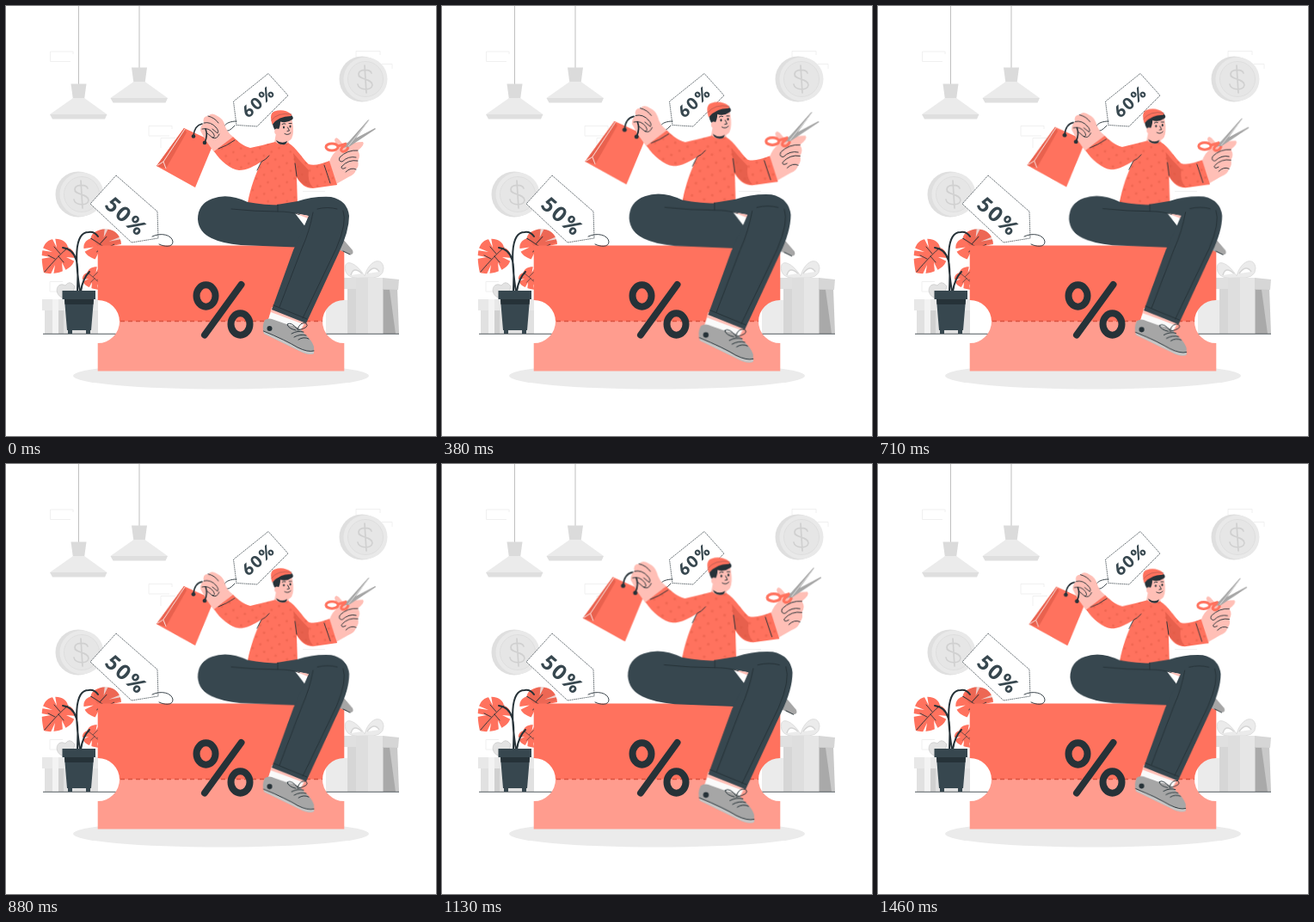
Animation, 500 px wide and 500 px high, one loop 1500 ms. Source, as an HTML page:

```html
<!DOCTYPE html>
<html lang="en">
<head>
<meta charset="utf-8">
<title>Discount coupon</title>
<style>
  html, body { margin: 0; width: 100%; height: 100%; overflow: hidden; background: #fff; }
  svg { display: block; width: 100vw; height: 100vh; }
  text { font-family: Lato, "Open Sans", sans-serif; text-anchor: middle; }
  .coral { fill: #ff725e; }
  .dark { fill: #37474f; }
  .skin { fill: #ffbfb6; }
  .line { fill: none; stroke: #263238; stroke-width: .9; stroke-linecap: round; stroke-linejoin: round; }
  .thick { stroke-width: 1.6; }
  .stem { stroke-width: 2; }
  .frame { fill: none; stroke: #ededed; stroke-width: .8; }
  .tag { fill: #fff; stroke: #263238; stroke-width: .7; stroke-dasharray: 1.6 .7; }
  .price { fill: #37474f; font-weight: 900; }
  #man {
    transform-origin: 302px 263.5px;
    animation: beat 1500ms linear infinite;
  }
  @keyframes beat {
    0%, 100% { transform: scale(1); }
    16% { transform: scale(1.091); }
    25.3% { transform: scale(1.068); }
    38.7% { transform: scale(1.029); }
    57.2% { transform: scale(.992); }
    74.7% { transform: scale(1.091); }
    98.2% { transform: scale(.992); }
  }
</style>
</head>
<body>
<svg viewBox="0 0 500 500">
  <defs>
    <g id="lamp">
      <path d="M84.5 0V92" stroke="#b8b8b8" stroke-width=".9"/>
      <path d="M75.500 90.500H93.500L91 109H78Z" fill="#dbdbdb"/>
      <path d="M78 107H91L117.500 126H51Z" fill="#ebebeb"/>
      <path d="M51 126H117.500L115 131.500H54Z" fill="#dfdfdf"/>
    </g>
    <g id="coin">
      <circle cx="-2" r="26.500" fill="#dfdfdf"/>
      <circle cx="2" r="25.500" fill="#e9e9e9"/>
      <circle cx="2" r="20.500" fill="#e6e6e6" stroke="#dcdcdc" stroke-width=".8"/>
      <path d="M9 -7C7 -12 -5 -12 -6 -6C-7 1 10 -1 10 7C9 14 -6 13 -7 6M1 -16L3 16"
        fill="none" stroke="#d0d0d0" stroke-width="1.700" stroke-linecap="round"/>
    </g>
    <g id="leaf">
      <path class="coral" d="M11 -9C10 -19 -6 -23 -14 -15C-22 -7 -19 10 -17 20C-8 23 6 20 14 13C21 7 21 -6 11 -9Z"/>
      <path d="M-20 0L-9 2L-20 4ZM-19 -9L-7 -4L-20 -6ZM-8 -21L-2 -9L-4 -21ZM-10 24L-4 11L-6 24ZM5 20L4 8L9 18ZM19 7L9 2L20 3Z" fill="#fff"/>
      <path class="line" d="M11 -9Q0 0 -16 19M2 -2L-5 -10M-4 4L-12 0M0 1L6 8"/>
    </g>
    <pattern id="dots" width="14" height="14" patternUnits="userSpaceOnUse" patternTransform="rotate(18)">
      <circle cx="3" cy="3" r="1.400" fill="#d9553f" opacity=".4"/>
      <circle cx="10" cy="10" r="1.400" fill="#d9553f" opacity=".4"/>
    </pattern>
    <path id="sweater" d="M313 158C302 161 293 163 284 165C276 163 270 158 264 152L242 169C249 180 261 190 271 191C280 191 289 186 297 181C290 196 284 212 281 229Q309 234 339 231L338 199C343 208 349 212 357 212L385 208L376 180C366 184 358 186 352 184C345 178 338 165 328 159Q320 164 313 158Z"/>
  </defs>

  <!-- room -->
  <path class="frame" d="M78 56V53H51.500V64.500H75M407 62V52.500H435V57M437 67.500H449V73M193 143V139.500H166V151H190M180 165V153.500H197M66 320.500H51V332H64M345 215.500H371"/>
  <use href="#lamp"/>
  <use href="#lamp" x="70.500" y="-19"/>
  <use href="#coin" x="416" y="85"/>
  <use href="#coin" x="86" y="219"/>

  <ellipse cx="250" cy="430" rx="172" ry="15.500" fill="#ebebeb"/>

  <!-- gifts -->
  <path d="M69 340C54 338 58 319 69 325Q74 318 80 326L76 340Z" fill="#e3e3e3" stroke="#d3d3d3"/>
  <path d="M45 353H107V381H45Z" fill="#e1e1e1"/>
  <path d="M42 341H107V354H42Z" fill="#e8e8e8"/>
  <path d="M54 341H61V381H54Z" fill="#f3f3f3"/>
  <path d="M61 354H67V381H61Z" fill="#d0d0d0"/>
  <path d="M417 314C405 295 391 294 395 309Q398 318 417 316Q439 318 439 305C438 291 422 295 417 314Z" fill="#ebebeb" stroke="#dedede"/>
  <path d="M401 313Q404 302 414 311M420 311Q428 300 434 309" fill="#fff" stroke="#d5d5d5" stroke-width="1.500"/>
  <path d="M372 342H401V381H372Z" fill="#ebebeb"/>
  <path d="M397 328H438V381H397Z" fill="#d6d6d6"/>
  <path d="M438 328H455L457 381H438Z" fill="#c9c9c9"/>
  <path d="M390 316H438V329H390Z" fill="#e0e0e0"/>
  <path d="M438 316L457 318L456 330L438 329Z" fill="#d6d6d6"/>
  <path d="M407 316H421V381H407Z" fill="#dedede"/>
  <path d="M421 316H438V381H421Z" fill="#e6e6e6"/>
  <path d="M439 330H446L453 381H439Z" fill="#a9a9a9"/>
  <path d="M43 381.300H457" stroke="#263238" stroke-width=".8"/>

  <!-- plant -->
  <use href="#leaf" x="61" y="290"/>
  <g>
    <use href="#leaf" transform="translate(112 278) scale(-1.15 .95) rotate(4)"/>
    <path d="M112 259Q130 258 134 275L110 282Q98 272 104 264Z" fill="#b84434" opacity=".25"/>
  </g>
  <use href="#leaf" transform="translate(103 316) scale(-.75 .66)"/>
  <path class="line stem" d="M83 332C83 312 88 284 66 281M86 332C81 300 78 263 96 263Q103 262 107 268M87 332Q89 317 97 309"/>
  <path class="dark" d="M68 341H102L99 377H71ZM72 376H77V381H72ZM93 376H98V381H93Z"/>
  <path d="M68 341H102L101.500 347H68.500Z" fill="#263238"/>
  <path class="dark" d="M65.500 331H104V341H65.500Z"/>

  <!-- coupon -->
  <path class="coral" d="M106.700 278.600H393.300V342A25 25 0 0 0 368 367H132A25 25 0 0 0 106.700 342Z"/>
  <path fill="#ff9c8e" d="M132 366.500H368A25 25 0 0 0 393.300 392V424.600H106.700V392A25 25 0 0 0 132 366.500Z"/>
  <path d="M133 366.500H368" stroke="#d9523f" stroke-width="1.300" stroke-dasharray="5 4"/>
  <g fill="none" stroke="#263238" stroke-width="8" stroke-linecap="round">
    <ellipse cx="232.500" cy="337" rx="11" ry="12.700"/>
    <ellipse cx="272.500" cy="370" rx="11" ry="12.700"/>
    <path d="M273.500 324L231 382.500"/>
  </g>

  <!-- price tags -->
  <path class="tag" d="M128 197L176 239L177 270L146 275L98 230Z"/>
  <path class="line" d="M170 268C180 263 193 266 194 274C194 281 184 280 178 277"/>
  <text class="price" font-size="24" letter-spacing="2.500" transform="translate(140 244.500) rotate(41.500)" y="9">50%</text>
  <path class="tag" d="M305 78.500L328 104L292 140L268 138.500L264.500 111Z"/>
  <path class="line" d="M268 134C259 134 251 138 255 144Q258 148 266 139"/>
  <text class="price" font-size="19" letter-spacing="2" transform="translate(293.500 111) rotate(-42)" y="7">60%</text>

  <g id="man">
    <!-- far shoe -->
    <path fill="#a6a6a6" d="M391 270L403 284Q405 289 400 289L386 283Z"/>
    <path class="line" d="M392 285L400 289"/>

    <!-- bag -->
    <path class="coral" d="M207 142L242 158L220 211L175 186Z"/>
    <path d="M207 142L175 186L186 189L210 147Z" fill="#e9614e"/>
    <path d="M208 143L183 181L176 185.500M183 181L186 189" fill="none" stroke="#fff" stroke-width=".8"/>

    <!-- bag hand -->
    <path class="skin" d="M242 170L232 156L226 145Q226 139 230 136Q228 128 235 128Q239 123 246 128Q252 131 254 137Q256 146 264 152Z"/>
    <path class="line" d="M230 136Q238 134 244 141M235 128Q243 130 247 136M244 141Q248 145 246 148L240 143M228 143Q236 141 241 148Q244 153 240 153L234 148M240 153Q245 156 248 149"/>
    <path class="line thick" d="M218 151Q219 139 228 137M231 159Q235 150 232 143"/>
    <circle cx="218" cy="151.500" r="2.300" fill="#263238"/>
    <circle cx="231" cy="159" r="2.300" fill="#263238"/>

    <!-- scissors and hand -->
    <path class="skin" d="M376 181Q379 172 386 167L382 156Q383 151 387 155L394 163Q404 158 415 158Q418 161 409 168Q413 174 409 180Q411 186 407 190Q406 196 398 199L384 207Z"/>
    <path d="M392 165L421 132.500L422.500 132.500L400 163ZM393 161L429 142L430 143L397 165Z" fill="#a6a6a6"/>
    <path d="M398 163L422 133" stroke="#e8e8e8" stroke-width=".8"/>
    <g fill="none" stroke="#ff725e" stroke-width="3">
      <ellipse cx="379" cy="164" rx="7" ry="4"/>
      <path d="M386 163L396 160M395 161Q387 167 391 169Q396 170 398 164"/>
    </g>
    <path class="line" d="M409 168Q397 167 388 176Q386 181 391 181Q398 174 407 176M409 180Q398 178 390 187Q390 191 395 188M407 190Q401 187 395 193"/>

    <!-- neck and sweater -->
    <path class="skin" d="M314 148H327L329 161Q321 168 312 159Z"/>
    <use href="#sweater" class="coral"/>
    <path d="M334 171Q342 181 352 191Q350 204 357 211Q346 211 338 199Z" fill="#c94a38" opacity=".45"/>
    <use href="#sweater" fill="url(#dots)"/>
    <path class="line" d="M306 174Q302 179 297 181L292 191M338 198L336 183M247 166Q256 163 266 156M370 185L377 206"/>

    <!-- head -->
    <path class="skin" d="M315 134L332 130Q335 142 333.500 150Q332 158 324 158Q315 157 314 148Z"/>
    <path d="M314 156Q321 161 327 157Q326 162 321 161Q316 161 314 156Z" fill="#263238"/>
    <path d="M310 137Q316 126 332 127Q335 130 333 132Q326 137 319 134.500Q319 141 315.500 146Q311 144 310 137Z" fill="#263238"/>
    <ellipse class="skin" cx="315" cy="146" rx="2.800" ry="3.400"/>
    <path class="coral" d="M309.500 138Q305.500 125 312 122.500Q323 119 331.500 125.500Q333 127 331 128Q317 128 309.500 138Z"/>
    <path class="line" d="M308.500 133Q316 123 332 126" opacity=".3"/>
    <ellipse cx="323" cy="141" rx="1" ry="1.500" fill="#263238"/>
    <ellipse cx="330.500" cy="140" rx="1" ry="1.500" fill="#263238"/>
    <path class="line" d="M321 137.500Q323 136 325 137M329 136.500L332 136.500M327.500 141L329.500 145L327 145.500M324 148.500Q328 151 331 147.500"/>

    <!-- near shoe -->
    <path class="skin" d="M309 350L350 366L344 375L306 361Z"/>
    <path d="M308 356L346 370L342 378L305 364Z" fill="#fafafa"/>
    <path d="M301 365Q306 362 312 365L329 371Q341 372 347 381Q356 389 358 396V404Q352 407 341 401L300 381Q297 373 301 365Z" fill="#a6a6a6"/>
    <path d="M299.500 378Q326 389 339 397Q351 403 358 401V404Q353 407 341 401L300 381Z" fill="#c7c7c7"/>
    <path class="line" d="M299.500 378Q326 389 339 397Q351 403 358 401"/>
    <circle cx="306.500" cy="375" r="3" fill="#263238"/>
    <path class="line" d="M337 377Q328 375 327 370Q332 367 339 376Q342 367 349 369Q354 374 339 377M332 381Q339 377 346 379M335 385Q342 381 349 383M340 388Q346 384 352 387"/>

    <!-- trousers -->
    <path class="dark" d="M281 228Q258 217 240 224Q223 230 223 248Q224 263 239 270Q251 276 273 278L337 280.500L375 248L339 231Q308 233 281 228Z"/>
    <path fill="#fff" d="M336 241L352 244L347.500 256Z"/>
    <path class="skin" d="M336 241L352 244L351 247Z"/>
    <path class="dark" d="M315 231L339 227Q357 221 378 222Q397 226 399 244Q399 262 387 287L349 369L309 353L334 284Q343 265 352 244Q345 239 316 239Z"/>
    <path class="line" d="M262 236Q290 239 316 239M357 240Q353 262 344 282L318 350M392 238Q397 252 384 282L345 363M311 348L350 364M362 236Q374 233 385 236"/>
    <path class="line" d="M316 231V239Q331 239 341 242.500" stroke-opacity=".9"/>
  </g>
</svg>
</body>
</html>
```
